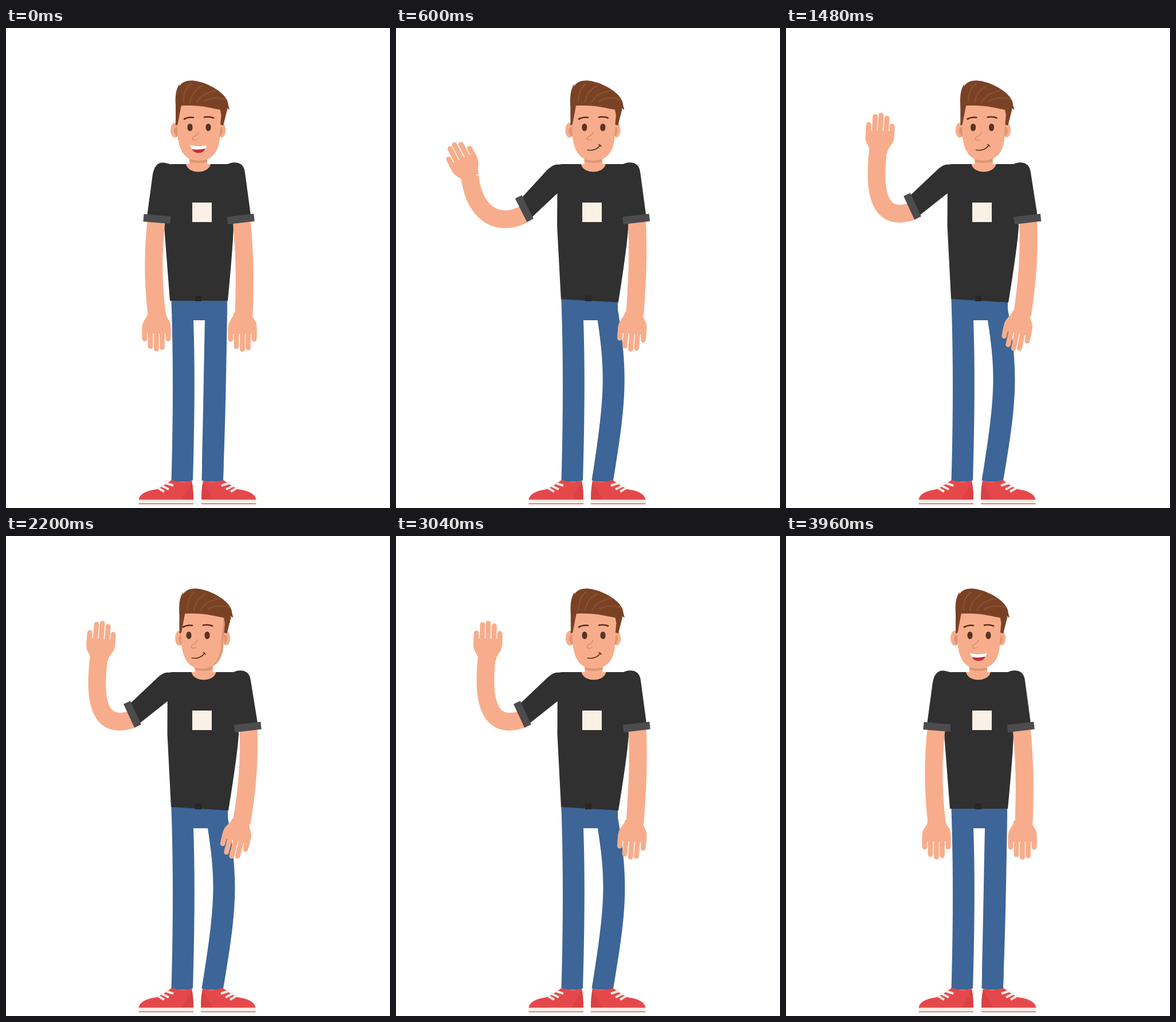
An HTML page that plays this animation: 670 by 836 pixels, repeating every 4 s.

```html
<!DOCTYPE html>
<html lang="en">
<head>
<meta charset="utf-8">
<title>Waving man</title>
<style>
  html, body { margin: 0; width: 100%; height: 100%; overflow: hidden; background: #fff; }
  svg { display: block; width: 100%; height: 100%; }
  .skin { fill: #f7ad8b; }
  .arm { fill: none; stroke: #f7ad8b; stroke-width: 31; }
  .shade { fill: #dd9674; }
  .hair { fill: #7a4225; }
  .shirt { fill: #303030; }
  .cuff { fill: none; stroke: #4c4b4d; stroke-width: 13; }
  .jeans { fill: #3d6597; }
  .fingers { fill: none; stroke: #f7ad8b; stroke-width: 8.8; stroke-linecap: round; }
  .strands { fill: none; stroke: #915632; stroke-width: 1.6; stroke-linecap: round; }
  .brow { fill: none; stroke: #5c2d1c; stroke-width: 2.6; }
  .eye { fill: #573326; }
  .line { fill: none; stroke: #d58a68; stroke-width: 1.3; stroke-linecap: round; }
  .laces { fill: none; stroke: #f9ece6; stroke-width: 4; }
</style>
</head>
<body>
<svg viewBox="0 0 670 836" xmlns="http://www.w3.org/2000/svg">
  <defs>
    <g id="hand">
      <path class="skin" d="M-15.5 3 C-16 -8 -25 -10 -24.5 -24 V-40 H-15.5 V-34 H17 V-40 H25.5 V-24 C25 -10 16 -8 15.5 3Z"/>
      <path class="fingers" d="M-20 -25V-43.5M-9.5 -28V-58.5M.5 -28V-61M11 -28V-56.5M21 -25V-43.5"/>
    </g>
    <g id="shoe">
      <path fill="#e5484a" d="M231.5 822 C233 810 248 805.5 262 803.5 C274 799 283 791 289 787 Q308 794 324 788 Q327 803 327 822Z"/>
      <path fill="#d94244" d="M324 790 Q327 803 327 821 H307Z"/>
      <path fill="#f9ece6" d="M231.5 821.5 H327 V828 H231.5Z"/>
      <path fill="#d94244" d="M231.5 828 H327 V829.2 H231.5Z"/>
      <path class="laces" d="M264 800.5 L276 807.5 M270 796.5 L284 803.5 M277 792 L292 797"/>
    </g>
    <path id="faceShape" d="M303 130 L299 172 C299 205 307 231 336 231 C364 231 373 209 373 185 L378 135Z"/>
    <clipPath id="faceClip"><use href="#faceShape"/></clipPath>
  </defs>

  <path class="jeans" id="jeans"/>
  <use href="#shoe"/>
  <g id="shoeR"><use href="#shoe" transform="scale(-1 1)"/></g>

  <path class="shirt" id="torso"/>
  <rect x="330" y="466" width="11" height="10" fill="#272727"/>
  <rect x="325" y="304" width="34" height="34" fill="#fbf0e4"/>

  <g id="neck">
    <path class="skin" d="M314 237 H320 V215 H351 V237 H357 C353 255 318 255 314 237Z"/>
    <path class="shade" d="M320 222 H351 V233 Q336 237 320 233Z"/>
  </g>

  <g id="head">
    <g id="ears">
      <ellipse class="skin" cx="294.5" cy="178" rx="7.5" ry="13"/>
      <ellipse class="skin" cx="376.5" cy="178" rx="6.8" ry="12.5"/>
      <path class="shade" d="M299 172 Q292 173 293 181 Q296 188 299 190Z M373 172 Q379 173 378 181 Q376 187 373 190Z"/>
    </g>
    <use class="shade" href="#faceShape"/>
    <g clip-path="url(#faceClip)"><path class="skin" id="faceFront"/></g>
    <path class="hair" d="M296 132 V170 L299.5 168 L306 134Z M373 138 L386 142 L379 170 L374 168 L375.5 152Z"/>
    <path class="hair" d="M296 136 C295 119 296 107 303 97 L302 102 C309 91 322 90 335 93 C354 97 382 112 387 129 L388 135 L390 142 L385 140 L386.5 143 C372 144 358 138 338 136 C320 134.500 307 135 296 136Z"/>
    <path class="strands" d="M310 129 Q309 108 323 97 M321 130 Q324 110 342 101 M333 129 Q343 112 367 109 M346 128 Q359 118 383 124"/>
    <g id="features">
      <path class="brow" d="M310 159 Q319 154 328 156 M345 155.5 Q355 153.5 363 157"/>
      <ellipse class="eye" cx="321" cy="173" rx="4.6" ry="6.6"/>
      <ellipse class="eye" cx="353" cy="173" rx="4.6" ry="6.6"/>
      <path class="line" d="M336 181 C334 189 326 188 325 192 C325 196 330 196 334 194"/>
      <g id="openMouth">
        <path fill="#fff" d="M321 204 Q336 208 350 204 C349 221 326 222 321 204Z"/>
        <path fill="#c32f33" d="M324.5 211 Q336 213 348 210 C344 220 329 220 324.5 211Z"/>
      </g>
      <path class="line" id="smile" style="stroke:#5c2d1c;stroke-width:1.6" d="M326 212.5 Q341 215 348.5 204 M346 203 Q348 203 350 206"/>
    </g>
  </g>

  <path class="arm" id="armR"/>
  <use href="#hand" id="handR"/>
  <path class="shirt" id="sleeveR"/>
  <path class="cuff" id="cuffR"/>

  <path class="arm" id="armL"/>
  <use href="#hand" id="handL"/>
  <path class="shirt" id="sleeveL"/>
  <path class="cuff" id="cuffL"/>
</svg>

<script>
const LOOP = 4000, STEP = 40, END = 3960;
const el = id => document.getElementById(id);
const path = (id, d) => el(id).setAttribute('d', d);
const place = (id, x, y = 0, turn = 0) =>
  el(id).setAttribute('transform', `translate(${x} ${y}) rotate(${turn})`);
const clamp = x => Math.min(1, Math.max(0, x));
const ease = x => (x = clamp(x), x * x * (3 - 2 * x));
const mix = (a, b, k) => a + (b - a) * k;

// Eased steps between [time, value] pairs, held at both ends
function track(keys, t) {
  const i = keys.findIndex(k => k[0] > t);
  if (i === 0) return keys[0][1];
  if (i < 0) return keys[keys.length - 1][1];
  const [t0, a] = keys[i - 1], [t1, b] = keys[i];
  return mix(a, b, ease((t - t0) / (t1 - t0)));
}

// Smooth curve through rows of [time, ...values]
function spline(rows, t) {
  const last = rows.length - 1;
  t = Math.min(Math.max(t, rows[0][0]), rows[last][0]);
  let i = 0;
  while (i < last - 1 && rows[i + 1][0] < t) i++;
  const a = rows[i], b = rows[i + 1], span = b[0] - a[0], x = (t - a[0]) / span;
  const slope = (k, c) => {
    if (k === last) return 0;
    const p = rows[Math.max(0, k - 1)], n = rows[k + 1];
    return (n[c] - p[c]) / (n[0] - p[0]) * span;
  };
  return a.slice(1).map((v, j) => {
    const c = j + 1, x2 = x * x, x3 = x2 * x;
    return (2 * x3 - 3 * x2 + 1) * v + (x3 - 2 * x2 + x) * slope(i, c)
      + (3 * x2 - 2 * x3) * b[c] + (x3 - x2) * slope(i + 1, c);
  });
}

// time, cuff outer, cuff inner, two arm controls, wrist, hand angle
const raise = [
  [0,   240, 330.5, 287, 334.5, 256, 390, 257, 450, 263, 498, -180],
  [280, 241, 325.5, 285, 341.5, 243, 384, 198, 407, 129, 421, -97],
  [400, 226, 310,   263, 343,   215, 365, 160, 368, 100, 354, -70],
  [560, 215, 296,   237, 336,   190, 350, 138, 338, 122, 272, -35],
  [800, 211, 290,   230, 331,   179, 335, 147, 316, 158, 213, 1]
];
const wave = [[900, 0], [1140, -4], [1500, 5], [1860, -1], [2200, 7], [2560, -18], [2900, 2], [3100, 0]];
const headTurn = [[1200, 0], [2000, 1], [2250, 1], [3150, 0]];
const restDrift = [[960, 0], [1700, 1], [2300, 1], [3040, 0]];

function drawLegs(lean) {
  const bow = Math.pow(lean, 0.6);
  const inner = 347 + 5 * bow, kneeIn = 345 + 21 * bow, kneeOut = 384 + 19 * bow;
  path('jeans', `M288.5 465 V475 Q293.5 620 288.5 788 Q308 793 326 788 Q331 620 327 509 H${inner}
    C${kneeIn} 600 ${kneeIn} 640 341.5 788 Q360 793 379 788
    C${kneeOut} 650 ${kneeOut + 3 * bow} 600 ${386 + bow} 490 V465Z`);
  place('shoeR', 668 - lean);
}

function drawBody(lean, turn) {
  path('torso', `M${280 + 2 * lean} 238 L290 237 H${388 + 10 * lean} L${397 + 9 * lean} 345
    Q${396 + 8 * lean} 380 ${387 + lean} ${475 + 3 * lean} L${286 + 2 * lean} ${475 - 3 * lean}
    L${276 + 5.5 * lean} 345Z`);
  place('neck', 9.5 * lean);
  place('head', 9 * lean - 2.5 * turn);
  place('ears', 1.5 * turn);
  place('features', -0.5 * lean - 8 * turn);
  const edge = 374 - 5 * turn;
  path('faceFront', `M290 120 H${edge + 6} L${edge} 185 C${edge} 209 ${edge - 9} 231 336 232 H290Z`);
}

function drawRestArm(lean, drift) {
  const s = 10 * lean, c = s + 2 * drift;
  path('sleeveR', `M${383 + s} 239 Q${393 + s} 233 ${402 + s} 234.5
    C${413 + s} 236 ${416 + s} 244 ${417 + s} 252 L${427 + c} 326 L${393 + c} 332 L${386 + s} 290Z`);
  path('cuffR', `M${386.5 + c} 335.5 L${433 + c} 330`);
  const x = 415 + 2 * lean - 6 * drift;
  path('armR', `M${411 + c} 334 C${417 + 7 * lean + drift} 395 ${417 + 4 * lean} 440 ${x} 500`);
  place('handR', x - 2, 498.5, 180 + 5 * lean + 9 * drift);
}

function drawWavingArm(u, lean, sway) {
  const [ox, oy, ix, iy, ax, ay, bx, by, wx, wy, angle] = spline(raise, u);
  const lift = ease((u - 200) / 420), s = 2.5 * clamp(lean * 3) * (1 - lift);
  const m = (a, b) => mix(a, b, lift) + s;
  const at = k => `${mix(ox, ix, k)} ${mix(oy, iy, k)}`;
  path('sleeveL', `M${m(290, 292)} 238 L${m(280, 283)} ${m(235.5, 238) - s}
    C${m(264, 277)} ${mix(231, 237, lift)} ${m(257, 271)} ${mix(242, 241, lift)}
    ${m(255, 264)} ${mix(262, 247, lift)} L${at(0.12)} L${at(0.96)} L279 ${mix(315, 290, lift)} L292 280Z`);
  path('cuffL', `M${at(0)} L${at(1)}`);
  const x = wx + 0.55 * sway;
  path('armL', `M${at(mix(0.48, 0.68, lift))} C${ax} ${ay} ${bx + 0.3 * sway} ${by} ${x} ${wy}`);
  place('handL', x + lift, wy, angle + 0.5 * sway);
}

function draw(t) {
  const back = t > LOOP / 2, u = back ? END - t : t;
  const lean = ease(u / 720);
  drawLegs(lean);
  drawBody(lean, track(headTurn, t));
  drawRestArm(lean, track(restDrift, t));
  drawWavingArm(back ? u * 0.925 : u, lean, track(wave, t));
  const open = u < 480;
  el('openMouth').style.display = open ? '' : 'none';
  el('smile').style.display = open ? 'none' : '';
}

const start = performance.now();
function tick() {
  const t = (performance.now() - start) % LOOP;
  draw(Math.floor(t / STEP) * STEP);
  requestAnimationFrame(tick);
}
tick();
</script>
</body>
</html>
```
